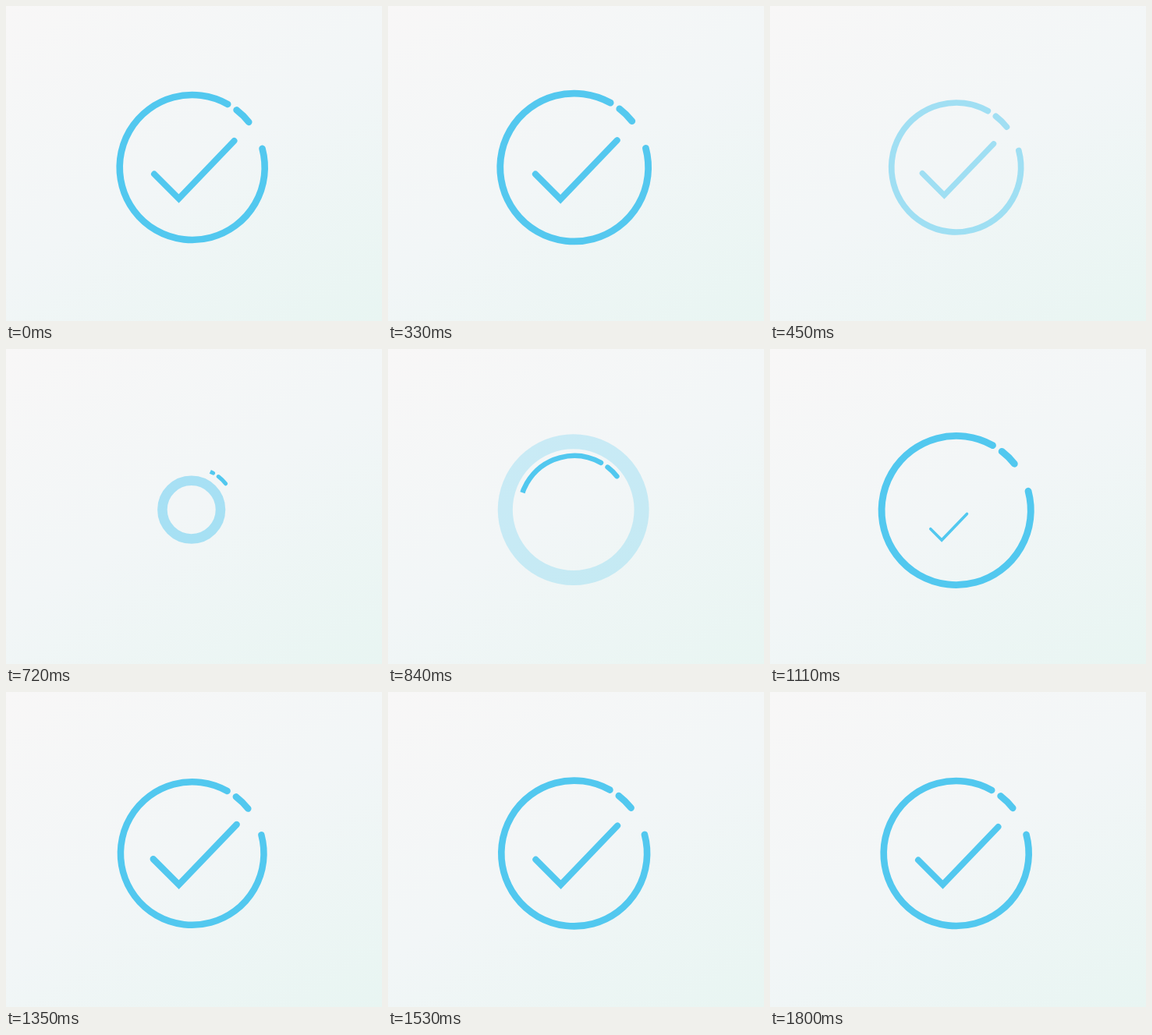
These frames come from a looping animation (482 px wide and 404 px high, 1830 ms). An HTML page with a canvas:

```html
<!DOCTYPE html>
<html lang="en">
<head>
<meta charset="utf-8">
<title>Check mark</title>
<style>
html, body { margin: 0; width: 100%; height: 100%; overflow: hidden; }
body { background: linear-gradient(150deg, #f8f7f7, #f2f6f7 50%, #e8f5f2); }
canvas { display: block; }
</style>
</head>
<body>
<canvas id="stage" width="482" height="404"></canvas>
<script>
const ctx = document.getElementById('stage').getContext('2d');
const LOOP = 1830, STEP = 30, BLUE = '#52c8ef';
const CX = 238.7, CY = 207, R = 93;

// Spring-like scale curves: [time, scale]
const circleKeys = [[660, .51], [720, .59], [930, .866], [1110, 1.028], [1170, 1.038],
  [1350, .987], [1510, 1.004], [1650, .999], [1800, 1]];
const checkKeys = [[930, 0], [1110, .455], [1350, 1.044], [1430, 1.075],
  [1620, .975], [1730, 1.002], [1800, 1]];

// Smooth curve through the keys
function track(keys, t) {
  const last = keys.length - 1;
  if (t <= keys[0][0]) return keys[0][1];
  if (t >= keys[last][0]) return keys[last][1];
  const i = keys.findIndex(k => k[0] > t) - 1;
  const slope = j => {
    const a = keys[Math.max(j - 1, 0)], b = keys[Math.min(j + 1, last)];
    return (b[1] - a[1]) / (b[0] - a[0]);
  };
  const [t0, v0] = keys[i], [t1, v1] = keys[i + 1];
  const d = t1 - t0, p = (t - t0) / d, q = 1 - p;
  return v0 * q * q * (1 + 2 * p) + v1 * p * p * (3 - 2 * p)
    + d * p * q * (slope(i) * q - slope(i + 1) * p);
}

// Degrees clockwise from twelve o'clock
const rad = deg => (deg - 90) * Math.PI / 180;

function scaled(x, y, s, draw) {
  ctx.save();
  ctx.translate(x, y);
  ctx.scale(s, s);
  ctx.translate(-x, -y);
  draw();
  ctx.restore();
}

function arc(from, to) {
  ctx.beginPath();
  ctx.arc(CX, CY, R, rad(from), rad(to));
  ctx.stroke();
}

function circle() {
  ctx.lineWidth = 8.6;
  arc(75, 389.3);
  arc(37.7, 51.3);
}

function check() {
  ctx.lineWidth = 8;
  ctx.beginPath();
  ctx.moveTo(190, 215.5);
  ctx.lineTo(221.5, 247);
  ctx.lineTo(292.5, 173);
  ctx.stroke();
}

function leave(t) {
  const p = Math.max(0, (t - 303) / 210);
  if (t >= 510) return;
  ctx.globalAlpha = 1 - p * p;
  scaled(CX, CY, 1 - p * p * (2.6 * p - 1.6), () => { circle(); check(); });
}

function ring(t) {
  if (t < 660 || t >= 994) return;
  const e = 1 - Math.max(0, 1 - (t - 650) / 300) ** 1.75;
  const outer = 117.2 * e, width = e * (42.5 - 23.5 * e);
  ctx.globalAlpha = .00171 * (994 - t);
  ctx.lineWidth = width;
  ctx.beginPath();
  ctx.arc(237.7, 206.1, outer - width / 2, 0, 2 * Math.PI);
  ctx.stroke();
}

function enter(t) {
  if (t < 660) return;
  ring(t);
  ctx.globalAlpha = 1;
  scaled(CX, CY, track(circleKeys, t), () => {
    if (t < 1107) {
      ctx.beginPath();
      ctx.moveTo(CX, CY);
      ctx.arc(CX, CY, 150, rad(70), rad(Math.min(70, 25 - .8 * (t - 720))), true);
      ctx.clip();
    }
    circle();
  });
  if (t > 930) scaled(219, 243.5, track(checkKeys, t), check);
}

function frame(now) {
  const t = Math.floor(now % LOOP / STEP) * STEP;
  ctx.clearRect(0, 0, 482, 404);
  ctx.globalAlpha = 1;
  ctx.strokeStyle = BLUE;
  ctx.lineCap = 'round';
  leave(t);
  enter(t);
  requestAnimationFrame(frame);
}
requestAnimationFrame(frame);
</script>
</body>
</html>
```
